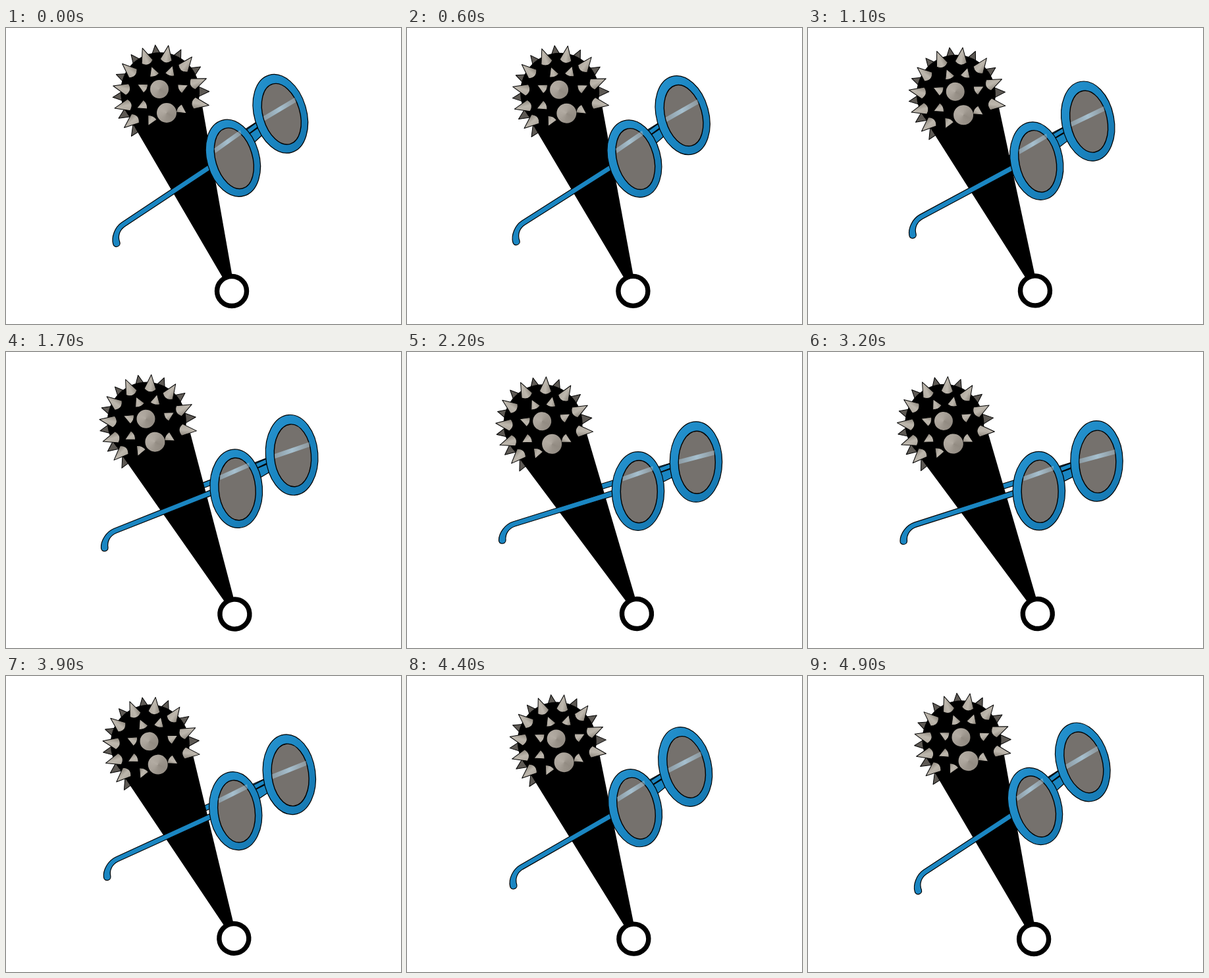
An HTML page with a canvas that plays this animation: 600 px wide and 450 px high, repeating every 5 s.

```html
<!DOCTYPE html>
<html lang="en">
<head>
<meta charset="utf-8">
<title>Spiked club and glasses</title>
<style>
html, body { margin: 0; width: 100%; height: 100%; overflow: hidden; background: #fff; }
canvas { display: block; width: 600px; height: 450px; }
</style>
</head>
<body>
<canvas id="stage" width="600" height="450"></canvas>
<script>
const ctx = document.getElementById('stage').getContext('2d');
const LOOP = 5000, STEP = 100, PEAK = 165;
const RAD = Math.PI / 180;
const BLUE = '#1a86c2', BLACK = '#000';
const swing = t => Math.cos(2 * Math.PI * (t - PEAK) / LOOP);

const CLUB = { x: 328, y: 346, amp: 3.56, rest: swing(0) };
const GLASSES = { x: 300, y: 226, amp: -9, rest: swing(2200) };

const HEAD = { x: 234, y: 97, r: 60 };
const AIM = { x: 234, y: 106 };
const CORE = { x: 238, y: 105, rx: 34, ry: 42 };
const RIM_COUNT = 9, CORE_COUNT = 7;

function ellipse(x, y, rx, ry = rx) {
  ctx.beginPath();
  ctx.ellipse(x, y, rx, ry, 0, 0, 2 * Math.PI);
}

function poly(...p) {
  ctx.beginPath();
  for (let i = 0; i < p.length; i += 2) ctx.lineTo(p[i], p[i + 1]);
  ctx.closePath();
}

function stroke(color, width) {
  ctx.lineWidth = width;
  ctx.strokeStyle = color;
  ctx.stroke();
}

function paint(fill, width = 0) {
  ctx.fillStyle = fill;
  ctx.fill();
  if (width) stroke(BLACK, width);
}

function gradient(x0, y0, x1, y1, ...colors) {
  const g = ctx.createLinearGradient(x0, y0, x1, y1);
  colors.forEach((c, i) => g.addColorStop(i / (colors.length - 1), c));
  return g;
}

function pose(part, t, draw) {
  ctx.save();
  ctx.translate(part.x, part.y);
  ctx.rotate(part.amp * RAD * (swing(t) - part.rest));
  ctx.translate(-part.x, -part.y);
  draw();
  ctx.restore();
}

// A cone with its tip at (x, y), its rounded base lying towards the aim point.
function spike(x, y, aim, length, width, bulge, fill) {
  ctx.save();
  ctx.translate(x, y);
  ctx.rotate(Math.atan2(aim.y - y, aim.x - x));
  const h = width / 2;
  ctx.beginPath();
  ctx.moveTo(0, 0);
  ctx.lineTo(length, h);
  ctx.quadraticCurveTo(length + bulge, 0, length, -h);
  ctx.closePath();
  paint(fill || gradient(0, h, 0, -h, '#b0a99f', '#bdb7ad', '#8b847a'), 1);
  ctx.restore();
}

// Tip on the head's rim; half steps fall between two front spikes.
function rimTip(i) {
  const a = RAD * (135 + 30.05 * i - 0.45 * i * (8 - i) - 2.5 * Math.sin(Math.PI * i / 4));
  const r = 71.5 + 5.5 * ((i - 4) / 4) ** 4;
  return [HEAD.x + r * Math.cos(a), HEAD.y + r * Math.sin(a)];
}

function coreTip(i) {
  const a = RAD * (122 + 44.5 * i - 1.1 * i * (6 - i));
  return [CORE.x + 1.22 * CORE.rx * Math.cos(a), CORE.y + 1.22 * CORE.ry * Math.sin(a)];
}

function stud(x, y, r) {
  const g = ctx.createConicGradient(-0.5, x, y);
  for (let i = 0; i <= 6; i++) {
    const v = 162 + 16 * Math.sin(i * Math.PI / 3 + 3.6);
    g.addColorStop(i / 6, `rgb(${v}, ${v - 7}, ${v - 16})`);
  }
  ellipse(x, y, r);
  paint(g);
}

function club() {
  for (let i = 0; i < RIM_COUNT; i++) spike(...rimTip(i - 0.5), HEAD, 16, 15, 0, '#5d5954');
  ellipse(HEAD.x, HEAD.y, HEAD.r);
  paint(BLACK);
  poly(297, 112, 344, 379, 330, 381, 191, 143);
  paint(BLACK);
  ellipse(343, 400, 22.5);
  stroke(BLACK, 7.4);
  for (let i = 0; i < CORE_COUNT; i++) spike(...coreTip(i), CORE, 14, 15, 4);
  stud(233, 93, 14);
  stud(244, 129, 15);
  for (let i = 0; i < RIM_COUNT; i++) spike(...rimTip(i), AIM, 22, 18, 9);
}

function farTemple() {
  poly(270, 208, 400, 169, 401, 177, 271, 216);
  paint(BLUE, 1.2);
}

function nearTemple() {
  ctx.beginPath();
  ctx.moveTo(316, 209.5);
  ctx.lineTo(161, 258);
  ctx.bezierCurveTo(149, 262, 139.5, 275, 139.5, 286);
  ctx.bezierCurveTo(139, 293, 150, 293, 150, 286);
  ctx.bezierCurveTo(149, 276, 155, 268, 164, 265);
  ctx.lineTo(318, 217.5);
  ctx.closePath();
  paint(BLUE, 1.2);
}

function bridge() {
  poly(380, 177, 402, 169, 402, 176, 381, 184);
  paint(BLUE, 1.2);
  poly(380, 185, 403, 177, 404, 190, 382, 201);
  paint(BLUE, 1.2);
}

function glare(x, y, dx, dy) {
  poly(x - dx, y - dy - 3.5, x + dx, y + dy - 3.5, x + dx, y + dy + 3.5, x - dx, y - dy + 3.5);
  paint(gradient(x - dx, y, x + dx, y,
    'rgba(165,198,218,.5)', 'rgba(175,206,224,.85)', 'rgba(165,190,205,.5)'));
}

function lens(x, y, ry) {
  ellipse(x, y, 39.7, ry);
  paint(gradient(x - 40, y - 30, x + 40, y + 30, '#2490cc', BLUE, '#1779b2'), 1.2);
  ellipse(x + 1.3, y + 0.8, 28, 47.5);
  paint('#75716d', 1.4);
}

function glasses() {
  nearTemple();
  bridge();
  lens(439, 167, 61.2);
  glare(440, 160, 27, -7);
  lens(351, 211.5, 59.8);
  glare(350.5, 185, 23, -8);
}

function frame(now) {
  const t = Math.floor((now % LOOP) / STEP) * STEP;
  ctx.fillStyle = '#fff';
  ctx.fillRect(0, 0, 600, 450);
  ctx.lineJoin = 'round';
  pose(GLASSES, t, farTemple);
  pose(CLUB, t, club);
  pose(GLASSES, t, glasses);
}

const start = performance.now();
function tick() {
  frame(performance.now() - start);
  requestAnimationFrame(tick);
}
tick();
</script>
</body>
</html>
```
